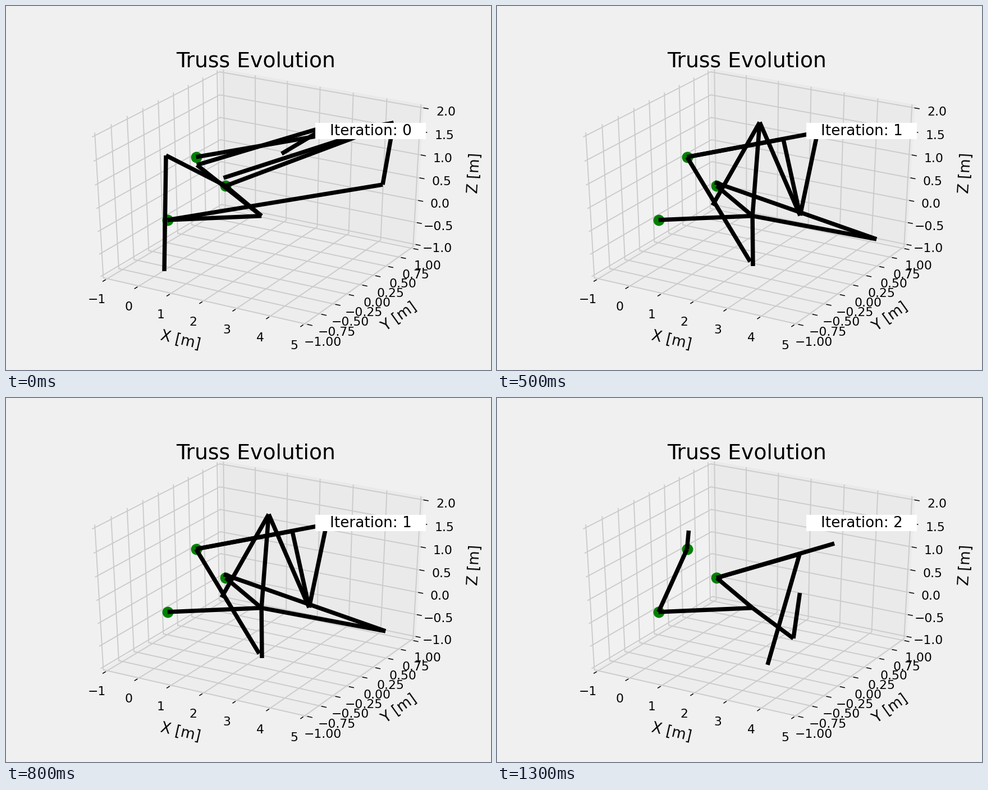
A matplotlib script for the animation above (1.5 s loop, 864 px wide and 648 px high).

```python
import numpy as np
import matplotlib.pyplot as plt
from matplotlib.animation import FuncAnimation
from matplotlib.patches import Polygon, Rectangle

W, H, DPI = 864, 648, 135
BG, GRID = "#f0f0f0", "#cbcbcb"
EDGE = 0.5 + 1 / 48      # half side of the padded unit cube
TICK_PAD, LABEL_PAD = 0.0676, 0.178

plt.rcParams.update({
    "font.family": "DejaVu Sans",
    "lines.solid_capstyle": "butt",
    "axes.unicode_minus": True,
})

fig = plt.figure(figsize=(W / DPI, H / DPI), dpi=DPI, facecolor=BG)
ax = fig.add_axes([0, 0, 1, 1])
ax.set_xlim(0, W)
ax.set_ylim(H, 0)
ax.axis("off")

# Camera at azimuth -60, elevation 30, ten cube sides away
az, el = np.radians([-60, 30])
RIGHT = np.array([-np.sin(az), np.cos(az), 0])
UP = np.array([-np.sin(el) * np.cos(az), -np.sin(el) * np.sin(az), np.cos(el)])
TOWARD = np.array([np.cos(el) * np.cos(az), np.cos(el) * np.sin(az), np.sin(el)])
LEFT, RIGHT_SIDE, BOTTOM, TOP = 0.08 * W, 0.95 * W, 0.93 * H, 0.12 * H
SCALE_X = (RIGHT_SIDE - LEFT) / 0.185
SCALE_Y = (BOTTOM - TOP) / 0.185


def project(p):
    """Map a point of the centred unit cube to stage pixels."""
    p = np.asarray(p, float)
    depth = 10 - p @ TOWARD
    return (LEFT + (0.095 + p @ RIGHT / depth) * SCALE_X,
            BOTTOM - (0.095 + p @ UP / depth) * SCALE_Y)


def node(x, y, z):
    """Map a position in metres to stage pixels."""
    return project(((x - 2) / 6, y / 2, (z - 0.5) / 3))


def path(points, color, width, z=2):
    xs, ys = zip(*points)
    return ax.plot(xs, ys, color=color, lw=width, zorder=z,
                   solid_joinstyle="round")[0]


def pane(corners, shade):
    ax.add_patch(Polygon([project(c) for c in corners], closed=True, lw=0.5,
                         fc=(shade,) * 3, ec=(shade,) * 3, alpha=0.5, zorder=1))


def draw_axis(i, edge, tick_dir, low, high, ticks, fmt, name, grid):
    """Draw one axis: edge holds the signs of its two fixed coordinates."""
    edge = np.array(edge, float)

    def at(pos, pad=0.0):
        p = edge * (EDGE + pad)
        p[i] = pos
        return p

    a, b = project(at(-EDGE)), project(at(EDGE))
    path([a, b], BG, 3)
    angle = np.degrees(np.arctan2(a[1] - b[1], b[0] - a[0]))
    angle = (angle + 90) % 180 - 90
    ax.text(*project(at(0, LABEL_PAD)), name, size=14, ha="center", va="center",
            rotation=angle, rotation_mode="anchor", zorder=6)

    spots = [(t - low) / (high - low) - 0.5 for t in ticks]
    for s in spots:
        corners = []
        for signs in grid:
            p = np.array(signs, float) * EDGE
            p[i] = s
            corners.append(project(p))
        path(corners, GRID, 1)
    for s, t in zip(spots, ticks):
        inner, outer = at(s), at(s)
        inner[tick_dir] -= edge[tick_dir] * 0.1 / 12
        outer[tick_dir] += edge[tick_dir] * 0.2 / 12
        path([project(inner), project(outer)], "black", 0.8)
        ax.text(*project(at(s, TICK_PAD)), fmt.format(t).replace("-", "\u2212"),
                size=14 * 0.833, ha="center", va="top", zorder=6)


E = EDGE
pane([(-E, -E, -E), (-E, E, -E), (-E, E, E), (-E, -E, E)], 0.95)
pane([(-E, E, -E), (E, E, -E), (E, E, E), (-E, E, E)], 0.90)
pane([(-E, -E, -E), (E, -E, -E), (E, E, -E), (-E, E, -E)], 0.925)

draw_axis(0, (0, -1, -1), 1, -1, 5, range(-1, 6), "{:d}", "X [m]",
          [(0, -1, -1), (0, 1, -1), (0, 1, 1)])
draw_axis(1, (1, 0, -1), 0, -1, 1, np.linspace(-1, 1, 9), "{:.2f}", "Y [m]",
          [(1, 0, -1), (-1, 0, -1), (-1, 0, 1)])
draw_axis(2, (1, 1, 0), 0, -1, 2, np.linspace(-1, 2, 7), "{:.1f}", "Z [m]",
          [(-1, -1, 0), (-1, 1, 0), (1, 1, 0)])

ax.text((LEFT + RIGHT_SIDE) / 2, 108.5, "Truss Evolution", size=14 * 1.44,
        ha="center", va="baseline", zorder=6)

# Fixed supports and the loaded joint
A, B, C = node(0, -0.5, 0), node(0, 0, 1), node(0, 0.5, 0)
D = node(2, 0, 0)
ax.plot(*zip(A, B, C), "o", color="green", ms=10.2, mew=0.4, zorder=3)

# Free joints of each design, in stage pixels
roof, knee, tip, hub = (285, 266), (340, 283), (690.5, 208), (575, 213)
corner = (671, 318)
first = [
    (roof, (282, 472)), (roof, C), (knee, D), (C, D), (A, D), (A, corner),
    (corner, tip), (B, tip), (knee, hub), ((491, 263), hub),
    ((387.5, 306), tip), (C, tip),
]

peak, foot, mid, cap = (468, 207), (540, 373), (510, 237), (571, 225)
far = (676, 415)
second = [
    (B, cap), (B, mid), (mid, foot), (cap, foot), (peak, (384, 355)),
    (peak, D), (peak, foot), (B, (451, 455)), (D, (456, 463)), (C, D),
    ((388, 314), far), (D, far), (A, D),
]

low, joint = (528, 428), (539, 278)
third = [
    (B, (341.5, 236)), (B, A), (A, D), (C, D), (D, low), (low, (539.5, 347)),
    (C, (601, 259)), (C, joint), (joint, (482, 475)),
]

designs = [first, second, third]
bars = [path([(0, 0), (0, 0)], "black", 4, z=4)
        for _ in range(max(map(len, designs)))]

ax.add_patch(Rectangle((551, 208), 197, 29, fc="white", lw=0, zorder=5))
counter = ax.text(649.5, 230.5, "", size=14, ha="center", va="baseline", zorder=6)


def update(n):
    design = designs[n]
    for k, bar in enumerate(bars):
        bar.set_visible(k < len(design))
        if k < len(design):
            bar.set_data(*zip(*design[k]))
    counter.set_text(f"Iteration: {n}")
    return bars + [counter]


anim = FuncAnimation(fig, update, frames=len(designs), interval=500,
                     repeat=True, repeat_delay=0)
plt.show()
```
